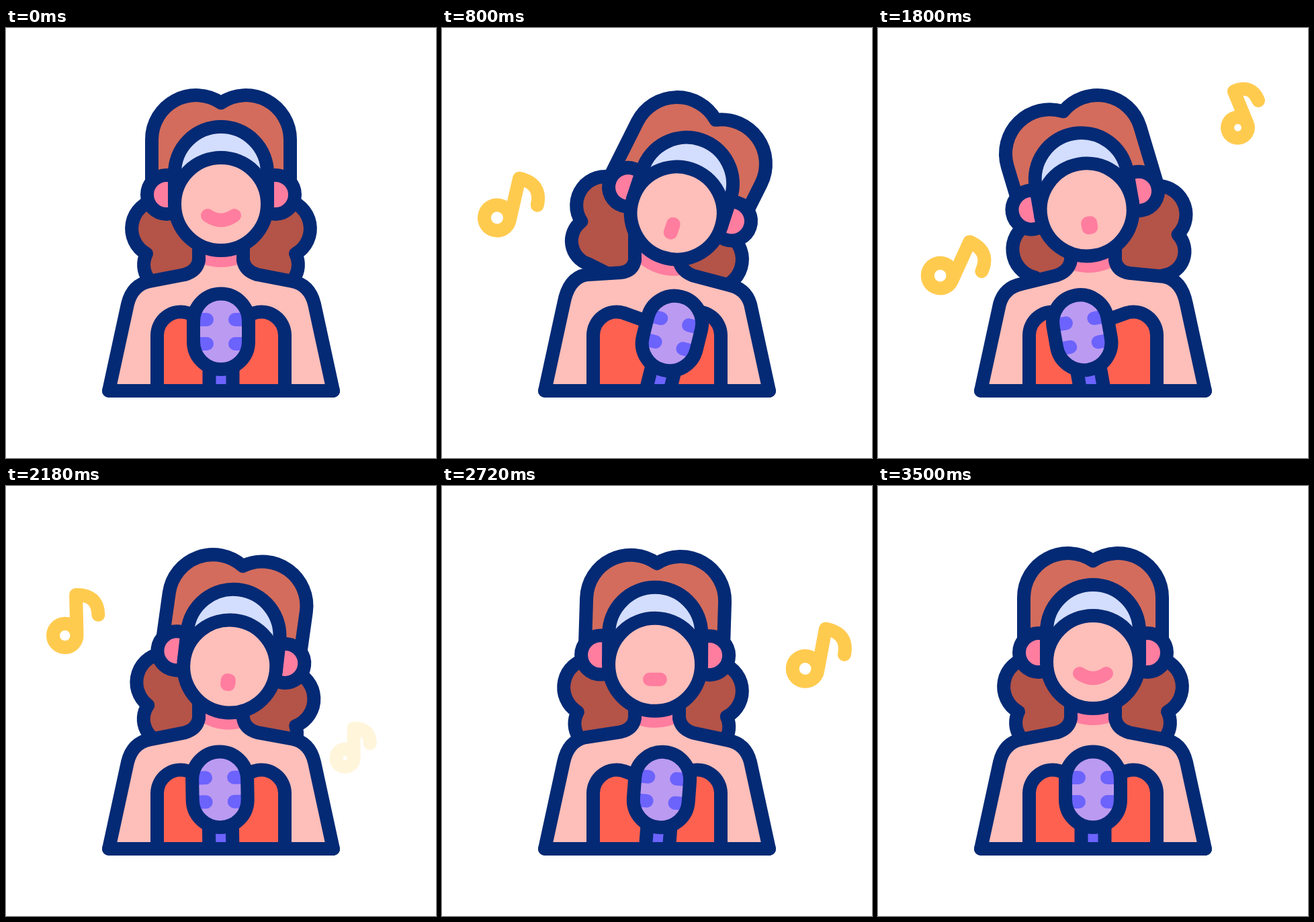
These frames come from a looping animation (640x640 px, 3.6 s). An HTML page with a canvas:

```html
<!DOCTYPE html>
<html lang="en">
<head>
<meta charset="utf-8">
<title>Singer</title>
<style>
html, body { margin: 0; width: 100%; height: 100%; overflow: hidden; background: #fff; }
canvas { display: block; width: 640px; height: 640px; }
</style>
</head>
<body>
<canvas width="640" height="640"></canvas>
<script>
const ctx = document.querySelector('canvas').getContext('2d');
const LOOP = 3600, REST = 3480, NOTE_TIME = 1080;
const NAVY = '#042a75', SKIN = '#febeb9', PINK = '#ff7d9f', YELLOW = '#ffcb4f';

const curls = 'M224 256A43 43 0 0 0 209 336A36 36 0 0 0 246 388H394A36 36 0 0 0 431 336A43 43 0 0 0 416 256Z';
const crown = 'M217 250V166A66 66 0 0 1 320 111.4A66 66 0 0 1 423 166V250';
const dress = 'M225 540V457A35 35 0 0 1 270 424L320 442L370 424A35 35 0 0 1 415 457V540';
const hairband = 'M251 262V216A69 69 0 0 1 389 216V262';
const micHandle = 'M302.5 538V500H337.5V538';
const micHead = 'M279 436.5a41 41 0 0 1 82 0V467a41 41 0 0 1 -82 0Z';
const micGrill = 'M284 434H299M284 470H299M341 434H356M341 470H356';

const ease = u => (1 - Math.cos(Math.PI * Math.min(1, Math.max(0, u)))) / 2;
const mix = (a, b, k) => a + (b - a) * k;
const fade = t => Math.min(1, Math.max(0, (REST - t) / 2680));

// Eases out to the first peak, then swings back and forth and dies away.
function swing(t, size, peak, period = 1440) {
  const pose = t < peak ? ease(t / peak) ** 2 : Math.cos(2 * Math.PI * (t - peak) / period);
  return size * fade(t) * pose;
}

function body(lean) {
  const lift = k => k * (k > 0 ? 9 : 5);
  const l = lift(lean), r = lift(-lean);
  return `M153 540L181 411Q188 ${382 - l} 214 ${377 - l}L266 ${367 - l * .3}Q284 362 287 346V300` +
    `H353V346Q356 362 374 ${367 - r * .3}L426 ${377 - r}Q452 ${382 - r} 459 411L487 540Z`;
}

function shape(path, fill, line = NAVY) {
  const p = new Path2D(path);
  if (fill) { ctx.fillStyle = fill; ctx.fill(p); }
  if (line) { ctx.strokeStyle = line; ctx.stroke(p); }
}

function circle(x, y, r, fill, line) {
  shape(`M${x - r} ${y}a${r} ${r} 0 1 1 ${2 * r} 0a${r} ${r} 0 1 1 ${-2 * r} 0Z`, fill, line);
}

function turned(x, y, degrees, draw, dx = 0, dy = 0) {
  ctx.save();
  ctx.translate(x + dx, y + dy);
  ctx.rotate(degrees * Math.PI / 180);
  ctx.translate(-x, -y);
  draw();
  ctx.restore();
}

function drawHair() {
  shape(curls, '#b45347');
  shape(crown, '#d36c5c');
}

function drawMouth(t) {
  const smile = 1 - ease(t / 600) * ease((REST - t) / 700);
  const open = (1 + Math.cos(2 * Math.PI * (t - 700) / 1320)) / 2;
  const w = mix(8 * (1 - open), 20, smile);
  const h = 7 * open * fade(t) * (1 - smile);
  const y = 262 + mix(22 + 2 * open, 17, smile), bend = 14 * smile;
  shape(`M${320 - w} ${y - h}Q320 ${y - h + bend} ${320 + w} ${y - h}V${y + h}` +
    `Q320 ${y + h + bend} ${320 - w} ${y + h}Z`, PINK, PINK);
}

function drawHead(t) {
  for (const x of [239, 401]) circle(x, 248, 29, PINK);
  shape(hairband, '#d3ddfd');
  circle(320, 262, 69, SKIN);
  drawMouth(t);
}

function drawMic() {
  ctx.lineCap = 'butt';
  shape(micHandle, '#6c63fd');
  ctx.lineCap = 'round';
  shape(micHead, '#bb9af1', null);
  shape(micGrill, null, '#6c63fd');
  shape(micHead);
}

function drawNote(u, onLeft) {
  if (u <= 0 || u >= 1) return;
  const p = ease(u ** 1.1), grown = 1 - Math.exp(-14 * p);
  const x = onLeft ? 82 + 124 * (p - .42) ** 2 : 543 - 100 * (p - .62) ** 2;
  const s = (1.12 - .33 * p * p) * mix(.65, 1, grown), r = 18 * s;
  ctx.globalAlpha = Math.min(1, u / .05, (1 - u) / .07);
  turned(0, 0, (35 - 40 * p - 27 * p * p) * grown, () =>
    shape(`M${r} 0A${r} ${r} 0 1 1 ${-r} 0A${r} ${r} 0 1 1 ${r} 0` +
      `V${-61 * s}Q${51 * s} ${-61 * s} ${51 * s} ${-30 * s}`, null, YELLOW), x, 405 - 287 * p);
  ctx.globalAlpha = 1;
}

function render(t) {
  ctx.fillStyle = '#fff';
  ctx.fillRect(0, 0, 640, 640);
  ctx.lineWidth = 20;
  ctx.lineJoin = ctx.lineCap = 'round';
  const mic = swing(t, 16, 962, 1670), torso = body(mic / 13);
  const onHead = draw =>
    turned(320, 262, swing(t, 20, 930), draw, swing(t, 30, 840), 13.5 * fade(t) * ease(t / 800));

  onHead(() => turned(320, 190, swing(t, 11, 1040), drawHair));
  shape(torso, SKIN, null);
  ctx.save();
  ctx.clip(new Path2D(torso));
  onHead(() => circle(320, 277, 79, PINK, null));
  ctx.restore();
  shape(torso);
  shape(dress, '#ff6150');
  onHead(() => drawHead(t));
  turned(320, 545, mic, drawMic);
  shape('M153 540H487');

  for (const cycle of [0, 1240]) {
    drawNote((t - cycle - 275) / NOTE_TIME, true);
    drawNote((t - cycle - 930) / NOTE_TIME, false);
  }
}

const begin = performance.now();
function tick() {
  render((performance.now() - begin) % LOOP);
  requestAnimationFrame(tick);
}
tick();
</script>
</body>
</html>
```
